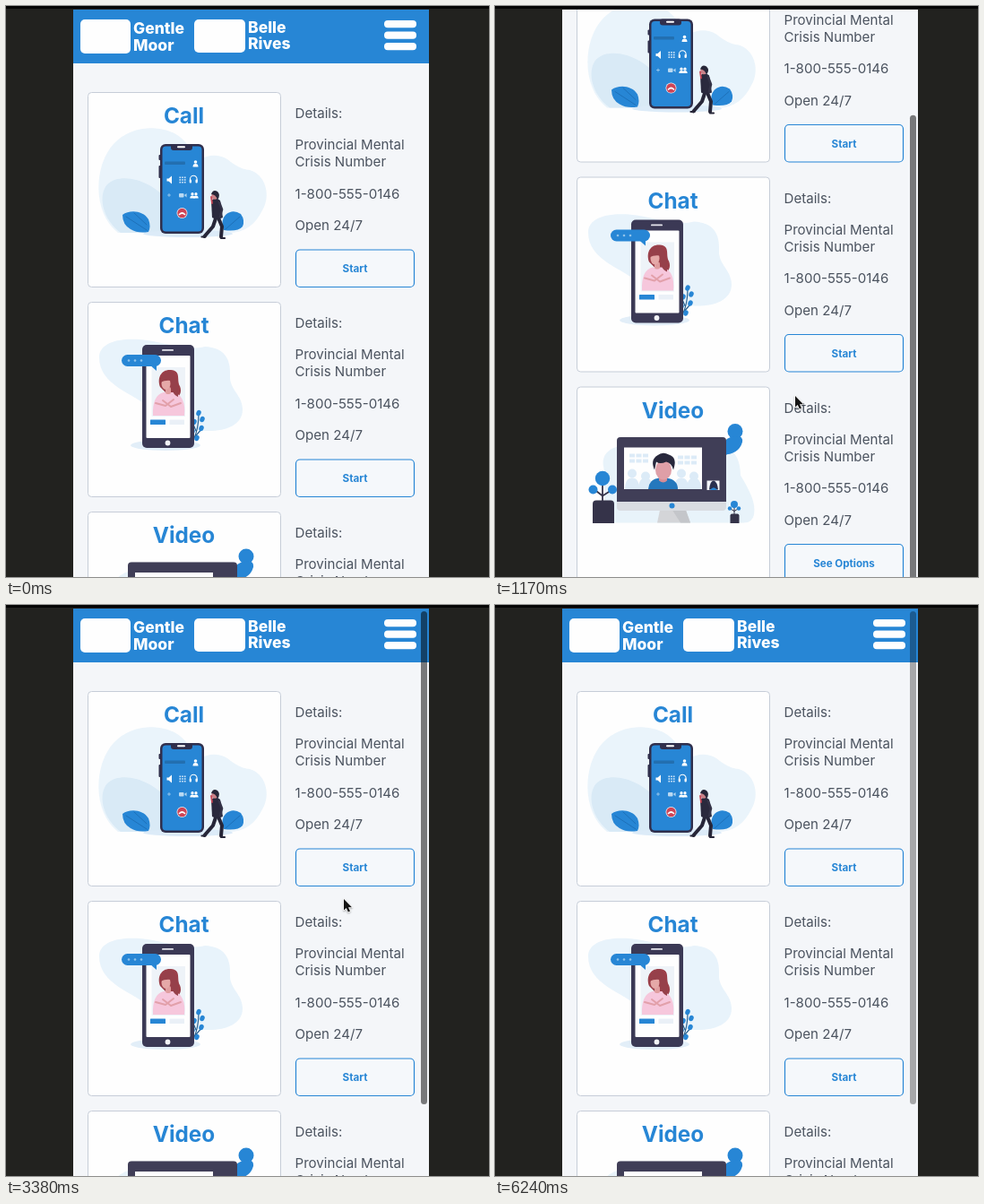
An HTML page with a canvas that plays this animation: 539 px wide and 637 px high, repeating every 6.37 s.

```html
<!DOCTYPE html>
<html lang="en">
<head>
<meta charset="utf-8">
<title>Help options</title>
<style>
html, body { margin: 0; width: 100%; height: 100%; overflow: hidden; background: #22221f; }
canvas { display: block; width: 539px; height: 637px; }
</style>
</head>
<body>
<canvas id="stage" width="539" height="637"></canvas>
<script>
const ctx = document.getElementById('stage').getContext('2d');
const LOOP = 6370, STEP = 130;
const BLUE = '#2786d5', NAVY = '#302f4c', PALE = '#eaf4fb', WHITE = '#fefefe';
const FONT = 'Inter, Lato, sans-serif';

// Rows are [time, value, ...]
const scrollKeys = [
  [520, 0], [650, 14], [780, 66], [910, 114.5], [1040, 132], [1170, 139.5],
  [2080, 139.5], [2210, 115.5], [2340, 45], [2470, 0]
];
const cursorKeys = [
  [2990, 335, 435], [3120, 340, 424], [3250, 358, 375], [3380, 377, 328],
  [3510, 386, 310], [3640, 389, 303], [3770, 389, 303], [3900, 388, 300],
  [4940, 388, 300], [5070, 384, 316], [5200, 366, 360], [5330, 344, 412], [5460, 335, 435]
];

function valueAt(keys, t) {
  if (t <= keys[0][0]) return keys[0].slice(1);
  for (let i = 1; i < keys.length; i++) {
    const a = keys[i - 1], b = keys[i];
    if (t <= b[0]) {
      const k = (t - a[0]) / (b[0] - a[0]);
      return a.slice(1).map((v, j) => v + (b[j + 1] - v) * k);
    }
  }
  return keys[keys.length - 1].slice(1);
}

function box(x, y, w, h, r, fill, line, width = 1) {
  ctx.beginPath();
  ctx.roundRect(x, y, w, h, r);
  if (fill) { ctx.fillStyle = fill; ctx.fill(); }
  if (line) { ctx.strokeStyle = line; ctx.lineWidth = width; ctx.stroke(); }
}

function oval(x, y, rx, ry, fill, turn = 0) {
  ctx.beginPath();
  ctx.ellipse(x, y, rx, ry, turn, 0, 7);
  ctx.fillStyle = fill;
  ctx.fill();
}

const disc = (x, y, r, fill) => oval(x, y, r, r, fill);

function shape(d, fill) {
  ctx.fillStyle = fill;
  ctx.fill(new Path2D(d));
}

function line(d, color, width) {
  ctx.strokeStyle = color;
  ctx.lineWidth = width;
  ctx.lineCap = ctx.lineJoin = 'round';
  ctx.stroke(new Path2D(d));
}

function label(text, x, y, size, weight, color, align = 'left') {
  ctx.font = `${weight} ${size}px ${FONT}`;
  ctx.fillStyle = color;
  ctx.textAlign = align;
  ctx.fillText(text, x, y);
}

function drawHeader() {
  box(75, 4, 397, 60, 0, BLUE);
  box(83, 15, 56, 38, 5, WHITE);
  box(210, 15, 57, 37, 5, WHITE);
  label('Gentle', 142, 31, 17.5, 800, WHITE);
  label('Moor', 142, 50, 17.5, 800, WHITE);
  label('Belle', 270, 30, 17.5, 800, WHITE);
  label('Rives', 270, 48, 17.5, 800, WHITE);
  for (let i = 0; i < 3; i++) box(422, 16 + i * 12.5, 36, 8.3, 4, WHITE);
}

// Illustrations: y counts from the top of the card.
function drawCall() {
  shape('M125 157C96 134 98 82 120 58C140 36 176 36 194 50C208 62 214 76 216 90V157Z', PALE);
  shape('M205 157V88C213 72 232 66 247 75C256 82 262 86 272 87C290 92 296 116 286 132C278 148 266 157 250 157Z', PALE);
  shape('M128 157C108 142 102 116 113 103C124 92 146 96 158 103C176 112 192 130 194 157Z', '#d9eaf6');
  oval(203, 158, 50, 4, '#dcebf8');
  shape('M130 137C138 131 153 132 159 142Q162 150 159 156Q147 158 139 153Q130 148 130 137Z', BLUE);
  line('M134 139L157 154M143 135L157 148', '#1b6bb2', .8);
  shape('M243 154Q239 143 245 137Q253 130 262 136Q267 143 264 150Q259 156 243 154Z', BLUE);
  line('M245 153L261 139', '#1b6bb2', .8);

  box(170.5, 70, 3, 6, 1, NAVY);
  box(170.5, 82, 3, 14, 1, NAVY);
  box(172, 58, 49, 100, 6, NAVY);
  box(174.5, 60.5, 44, 95, 4, BLUE);
  box(184, 58, 24, 7, 3, NAVY);
  box(191, 60.2, 9, 2, 1, WHITE);
  box(177, 77.5, 23, 3.5, 1, '#226fb0');
  drawPerson(211.5, 80, 1);
  shape('M179.5 96.5h2l3.5-3v9l-3.5-3h-2z', WHITE);
  for (let i = 0; i < 9; i++) box(193.5 + i % 3 * 2.7, 94.5 + Math.floor(i / 3) * 2.7, 1.6, 1.6, 0, '#d9ebfa');
  line('M205.5 99V97a3.8 3.8 0 0 1 7.6 0V99', WHITE, 1.1);
  box(204.7, 97.5, 2.3, 4, 1, WHITE);
  box(211.5, 97.5, 2.3, 4, 1, WHITE);
  line('M180.5 115h3M182 113.5v3', '#a9d0ef', .8);
  box(193, 113, 5.5, 4.5, 1, '#b9d9f2');
  shape('M199 115l2.5-2v4.5z', '#b9d9f2');
  drawPerson(208, 115.5, .9);
  drawPerson(212, 115.5, .9);
  disc(196.5, 135, 6, '#e8eaf0');
  disc(196.5, 135, 5.2, '#cf4456');
  line('M193.5 136.5Q196.5 133.5 199.5 136.5', WHITE, 1.7);

  line('M235 138L231 150L221.5 161', '#272638', 4);
  line('M236 138L241 150L240 161.5', '#272638', 4);
  line('M218.5 161.5h4M240 163h4', '#272638', 2.2);
  shape('M229 121Q234 116 239 121L242 140Q235 143 230 140Z', '#2a293d');
  line('M238 123L241 131L239 139', '#343347', 2.6);
  disc(233, 116, 3.7, '#c98288');
  shape('M229 114Q231 108 236 111Q240 115 236 120Q234 114 229 114Z', '#272638');
  line('M230 124L229 117', '#c74857', 1.8);
}

function drawPerson(x, y, k) {
  disc(x, y - 2 * k, 1.8 * k, WHITE);
  shape(`M${x - 3 * k} ${y + 3.4 * k}Q${x - 3 * k} ${y} ${x} ${y}T${x + 3 * k} ${y + 3.4 * k}Z`, WHITE);
}

function drawChat() {
  shape('M104 62C104 44 130 39 158 43C184 47 202 55 222 50C243 51 251 63 250 82C249 98 264 104 264 120C264 138 244 145 222 144C194 142 171 138 157 116C142 102 104 93 104 62Z', '#e8f3fb');
  oval(178, 160, 39, 6, '#e2eef8');
  line('M205 160Q215 148 215 124M208 154L219 141M212 144L207 132', '#28608f', 1.2);
  [[215, 124], [219, 131], [210, 134], [218, 141], [208, 145], [213, 152]]
    .forEach(([x, y]) => oval(x, y, 2.6, 3.3, BLUE, .4));
  box(152, 48, 58, 115, 5, '#3b3955');
  box(156.5, 60, 49, 92, 1, WHITE);
  box(174, 53, 13, 1.8, 1, '#e5e5ec');
  disc(180.5, 157.5, 2.9, '#f1f2f5');
  box(162.5, 73, 37.5, 55, 0, '#eef3f8');

  shape('M172 95C168 84 174 75 184 76C196 77 190 87 194 94C198 104 190 111 181 104Z', '#9b3f49');
  shape('M164 127Q163 104 176 101H188Q201 106 199 127Z', '#f6c7dc');
  box(178, 95, 6, 8, 2, '#df9d9f');
  oval(178.5, 91, 5, 7, '#e5a9a8');
  shape('M172 90Q174 76 185 77Q193 87 192 106Q184 103 184 88Q178 87 172 90Z', '#96404a');
  line('M167 113L178 116L187 109M195 113L184 117L175 110', '#e2a0aa', 2);

  box(161, 131.5, 17, 5.5, .5, BLUE);
  box(182.5, 131.5, 16.5, 5.5, .5, '#eaf0f7');
  box(129, 59, 44, 13, 6.5, BLUE);
  shape('M160 70L168 77L168 69Z', BLUE);
  [137, 144, 151].forEach(x => disc(x, 65.5, 1.3, '#8fc2ea'));
}

function drawVideo() {
  shape('M128 152C116 130 126 112 121 89C118 72 134 64 154 66H246C269 66 274 84 274 99C282 113 292 129 289 143Q287 152 278 152Z', '#e8f3fa');
  line('M258 76L264 56', '#1b6bb2', 1);
  disc(268, 50, 8.5, BLUE);
  shape('M254 76V65Q258 56 267 56Q277 54 276 62Q272 76 254 76Z', BLUE);

  shape('M184 138H213L218 152H181Z', '#d4d5d8');
  shape('M198 138H213L218 152H207Z', '#c4c6ca');
  box(136, 56.5, 122, 82, 4, '#d9dce1');
  box(136, 56.5, 122, 72, [4, 4, 0, 0], '#403e57');
  disc(197.5, 133, 3, BLUE);
  box(144, 68, 87, 46.5, 0, WHITE);
  for (let i = 0; i < 6; i++) {
    const x = i % 3 * 7.5, y = 75 + Math.floor(i / 3) * 6;
    box(150 + x, y, 6, 4, 0, '#dcebf7');
    box(204 + x, y + 2, 6, 4, 0, '#dcebf7');
  }
  [153, 168, 208, 222].forEach((x, i) => {
    disc(x, 97 + i % 2 * 3, 5, '#dcebf7');
    shape(`M${x - 8} 114.5Q${x - 8} 102 ${x} 102T${x + 8} 114.5Z`, '#dcebf7');
  });
  shape('M171 114.5Q172 103 183 102H192Q204 104 204 114.5Z', '#2578bd');
  shape('M183 98H192V105Q188 109 183 105Z', '#d58c95');
  oval(188, 93, 9, 11, '#df9fa7');
  shape('M178 93Q173 82 181 77Q187 72 194 76Q204 79 199 93Q197 85 191 84Q184 87 180 84Z', '#28283c');

  box(236.5, 105, 14, 10.5, 0, '#f4f6f9');
  shape('M239 115Q240 105 244 105Q248 106 249 115Z', '#29304f');
  shape('M240 115.5Q244 110 248 115.5Z', BLUE);

  line('M120 130V102M120 122L111 115M120 122L131 115', '#353349', 1.8);
  disc(120, 102.5, 8.2, BLUE);
  disc(109.5, 115, 5, BLUE);
  disc(131, 115, 5, BLUE);
  box(109, 127, 24, 25.5, [4, 4, 0, 0], '#353349');
  line('M267 144V131M267 139L262 136M267 139L272 136', '#353349', 1);
  disc(267, 131.5, 4, BLUE);
  disc(262, 136, 2.2, BLUE);
  disc(272, 136, 2.2, BLUE);
  box(262.5, 142, 10, 10.5, [2, 2, 0, 0], '#353349');
}

const cards = [
  { title: 'Call', action: 'Start', art: drawCall },
  { title: 'Chat', action: 'Start', art: drawChat },
  { title: 'Video', action: 'See Options', art: drawVideo }
];
const details = [
  ['Details:', 29], ['Provincial Mental', 64], ['Crisis Number', 83],
  ['1-800-555-0146', 118.5], ['Open 24/7', 154]
];

function drawCard(card, top, hover) {
  ctx.save();
  ctx.translate(0, top);
  box(91.5, .5, 215, 217, 4, WHITE, '#c6cdd8');
  label(card.title, 198.5, 35, 24.3, 700, BLUE, 'center');
  card.art();
  details.forEach(([text, y]) => label(text, 322.5, y, 15.1, 400, '#4b535f'));
  box(323.5, 176, 132, 41.5, 4.5, hover ? BLUE : '#f5f8fb', BLUE, 1.2);
  label(card.action, 389.5, 201, 11.6, 700, hover ? WHITE : BLUE, 'center');
  ctx.restore();
}

function drawCursor(x, y, hand) {
  ctx.save();
  ctx.translate(x, y);
  ctx.shadowColor = 'rgba(0,0,0,.3)';
  ctx.shadowBlur = 2;
  ctx.shadowOffsetY = 1;
  const d = hand
    ? 'M-1.2 1Q0-.8 1.3 1L2 5.5L4 5L5 6L7 5.8L8 7L9 7.5L8.5 11L7 15H0L-4 9.5Q-4 7.5-2 8.3L-.2 10Z'
    : 'M0 0V12.5L2.8 10L4.8 14.5L7 13.5L5 9.2H9Z';
  line(d, hand ? '#222' : WHITE, hand ? 1.8 : 1.6);
  ctx.shadowColor = 'transparent';
  shape(d, hand ? WHITE : '#151515');
  if (hand) line('M2.5 9.5V12M4.7 9.5V12M6.8 9.5V12', '#333', .7);
  ctx.restore();
}

function draw(t) {
  const [scroll] = valueAt(scrollKeys, t);
  const [cx, cy] = valueAt(cursorKeys, t);
  const hover = cy < 314;

  box(0, 0, 539, 637, 0, '#22221f');
  box(0, 0, 539, 3, 0, '#050505');
  ctx.save();
  ctx.beginPath();
  ctx.rect(75, 4, 397, 633);
  ctx.clip();
  box(75, 4, 397, 633, 0, '#f4f6f9');
  ctx.save();
  ctx.translate(0, -scroll);
  drawHeader();
  cards.forEach((card, i) => drawCard(card, 96 + 234 * i, hover && i === 0));
  ctx.restore();

  if (t >= 650) {
    const alpha = t < 6110 ? .51 : t < 6240 ? .43 : .32;
    box(463, 7 + scroll * .822, 7, 550, 3.5, `rgba(0,0,0,${alpha})`);
  }
  if (t >= 260 && t < 5590) drawCursor(cx, cy, hover);
  ctx.restore();
}

const start = performance.now();
function tick() {
  const t = (performance.now() - start) % LOOP;
  draw(Math.floor(t / STEP) * STEP);
  requestAnimationFrame(tick);
}
tick();
</script>
</body>
</html>
```
